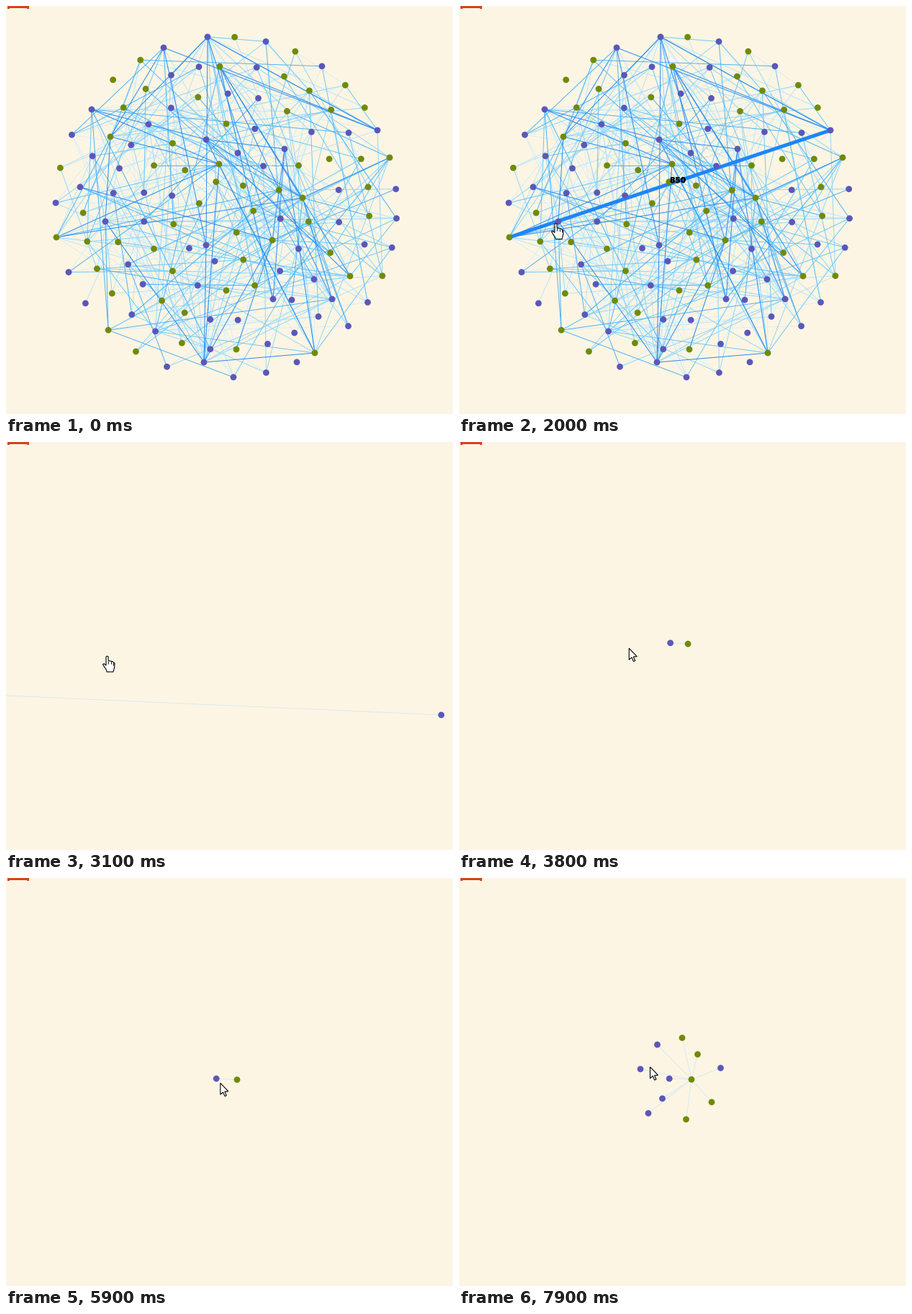
These frames come from a looping animation (621 by 568 pixels, 8 s). A matplotlib script:

```python
import numpy as np
import matplotlib.pyplot as plt
from matplotlib.animation import FuncAnimation
from matplotlib.collections import LineCollection
from matplotlib.patches import Polygon, Rectangle
from matplotlib.patheffects import withStroke

W, H, DPI = 621, 568, 72  # one point equals one pixel
PAPER, PURPLE, GREEN, STRONG = "#fdf5e3", "#5b57b9", "#718a07", "#1e86fa"
SHADES = ["#d8effa", "#b9e5fa", "#93d8fb", "#6cc9fa", "#4db4f7"]
DARK, PALE, PALE_FOCUS = "#2a8cf0", "#d5ebf3", "#cbe9f3"
DOT, CORE = 8.8 ** 2, 4.6 ** 2
CENTER = np.array([306, 280])

# radius, node count, first angle and angular swing of each shell of the disc
RINGS = [(237, 33, -8, -5.5), (199, 31, -11, 0), (158, 25, -29, 8),
         (116, 18, -40, 0), (77, 12, -48, 0), (38, 6, -22, 0)]
PURPLE_HUBS = [(280, 43), (219, 58), (119, 144), (278, 186), (387, 199), (516, 173),
               (103, 252), (138, 300), (278, 333), (453, 408), (371, 408), (275, 496)]
GREEN_HUBS = [(297, 84), (145, 182), (296, 220), (533, 211), (412, 267), (370, 326),
              (70, 322), (478, 376), (429, 483), (320, 478)]

rng = np.random.default_rng(5)


def make_nodes():
    shells = []
    for radius, count, first, swing in RINGS:
        turn = 2 * np.pi * np.arange(count) / count
        angle = np.radians(first + swing * (1 - np.cos(turn))) + turn
        shells.append(CENTER + radius * np.column_stack([np.sin(angle), -np.cos(angle)]))
    points = np.vstack(shells)
    colors = rng.choice([PURPLE, GREEN], len(points))
    hubs = []
    for spots, color in ((PURPLE_HUBS, PURPLE), (GREEN_HUBS, GREEN)):
        for spot in spots:
            gap = np.hypot(*(points - spot).T)
            gap[hubs] = np.inf
            hubs.append(int(gap.argmin()))
            points[hubs[-1]] = spot
            colors[hubs[-1]] = color
    return points, colors, hubs


nodes, node_colors, hubs = make_nodes()


def find(x, y):
    return int(np.hypot(*(nodes - (x, y)).T).argmin())


def random_links(count, pull, longest):
    found = set()
    while len(found) < count:
        a, b = sorted(rng.choice(len(nodes), 2, replace=False, p=pull / pull.sum()).tolist())
        if 50 < np.hypot(*(nodes[a] - nodes[b])) < longest:
            found.add((a, b))
    return rng.permutation(sorted(found))


hub_pull = np.zeros(len(nodes))
hub_pull[hubs] = 1
pull = rng.uniform(0.2, 1.3, len(nodes)) + 1.3 * hub_pull
weak = random_links(310, pull, 380)
strong = random_links(34, hub_pull, 400)
main_link = (find(70, 322), find(516, 173))
links = np.vstack([weak, strong, [main_link]])
shades = np.sort(rng.choice(len(SHADES), len(weak), p=[.28, .21, .2, .2, .11]))
link_colors = [SHADES[s] for s in shades] + [DARK] * len(strong) + [SHADES[1]]

# time, x and y of the pointer's tip
TRACK = np.array([(3, 590, 330), (12, 270, 262), (20, 134.5, 302.5), (26, 140.5, 298),
                  (31, 140.5, 298), (42, 291, 281), (46, 296.5, 282), (54, 302, 303),
                  (60, 297, 282), (66, 323, 282), (71, 323.5, 285), (79, 265.5, 263)])
HAND = np.array([(-1.5, 1), (0, 0), (1.5, 1), (1.7, 6.5), (7, 7.4), (10.4, 10), (10.3, 15),
                 (8.5, 22), (-0.5, 22), (-1, 19.5), (-6, 11.5), (-4.2, 10.6), (-1.5, 13)])
ARROW = np.array([(0, 0), (0, 16), (3.7, 12.6), (6.2, 18.3), (8.5, 17.3), (6, 11.8), (11, 11.5)])
KNUCKLES = [np.array([(x, y), (x, y + 4)]) for x, y in ((1.7, 6.5), (5, 7.3), (8, 8.5))]

LEAF_STARTS = np.array([(-150, 56), (189, 299), (120, 381), (44, 469), (800, 184),
                        (502, 88), (557, 231), (551, 379), (525, 462)])
LEAF_ENDS = np.array([(275.5, 232), (252, 266), (282.5, 307), (263, 327.5), (363.5, 264.5),
                      (310, 222.5), (331.5, 245.5), (351, 312), (315.5, 336)])
LEAF_COLORS = [PURPLE] * 5 + [GREEN] * 4
NODE0, NODE1, ROOT = np.array([(292.2, 279.3), (321, 280.8), (323, 280.5)])

fig = plt.figure(figsize=(W / DPI, H / DPI), dpi=DPI, facecolor=PAPER)
ax = fig.add_axes([0, 0, 1, 1])
ax.set(xlim=(0, W), ylim=(H, 0))
ax.axis("off")
for x, y, w, h in ((2, 0, 30, 3), (2, 3, 3, 1), (29, 3, 3, 1)):
    ax.add_patch(Rectangle((x, y), w, h, color="#d2451e", lw=0))

lines = ax.add_collection(LineCollection([], zorder=2))
focus = ax.add_collection(LineCollection([], zorder=3))
halo = ax.scatter([], [], s=13 ** 2, c="#dcdbe0", lw=0, zorder=4)
dots = ax.scatter([], [], lw=0, zorder=5)
labels = [ax.text(0, 0, "", family="DejaVu Sans", va="center", zorder=6,
                  path_effects=[withStroke(linewidth=0.4, foreground="black")])
          for _ in range(3)]
pointer = ax.add_patch(Polygon(ARROW, fc="white", ec="black", lw=1.1, zorder=8))
folds = ax.add_collection(LineCollection([], colors="black", linewidths=0.9, zorder=9))


def show_graph(points, colors, pairs, pair_colors, hovered=None):
    lines.set_segments([points[list(pair)] for pair in pairs])
    lines.set_color(pair_colors)
    lines.set_linewidth(1)
    dots.set_offsets(points)
    dots.set_facecolors(colors)
    sizes = np.full(len(points), DOT)
    if hovered is not None:
        sizes[hovered] = CORE
    dots.set_sizes(sizes)


def highlight(a, b, color, width):
    focus.set_segments([np.array([a, b])])
    focus.set_color(color)
    focus.set_linewidth(width)


def put_label(slot, text, x, y, size=11, **style):
    labels[slot].set(text=text, position=(x, y), fontsize=size,
                     **{"fontweight": "normal", "ha": "left", **style})


def link_under(tip):
    """Topmost link passing within 3 pixels of the tip."""
    a, b = nodes[links[:, 0]], nodes[links[:, 1]]
    span = b - a
    along = np.clip(((tip - a) * span).sum(1) / (span ** 2).sum(1), 0, 1)
    gap = np.hypot(*(a + along[:, None] * span - tip).T)
    near = np.flatnonzero(gap < 3)
    return near[-1] if len(near) else None


def network_scene(n, tip):
    points = nodes if n < 29 else CENTER + (nodes - CENTER) * 0.992
    named = find(138, 300) if n >= 26 else None
    show_graph(points, node_colors, links, link_colors, named)
    if named is not None:
        others = find(278, 333), find(296, 220)
        highlight(points[named], points[others[0]], SHADES[3], 4)
        for slot, (i, number) in enumerate(zip((named, *others), (32, 28, 49))):
            x, y = points[i]
            put_label(slot, f"Node {number}", x + 0.5, y + 15, 13 if i == named else 11)
        return True
    hit = link_under(tip) if 3 <= n < 22 else None
    if hit is None:
        return False
    a, b = points[links[hit]]
    highlight(a, b, STRONG, 5)
    x, y = (a + b) / 2
    weight = 850 - 10 * (len(links) - 1 - hit) % 850
    put_label(0, str(weight), x + 11, y - 4.5, 10.5, fontweight="bold", ha="center")
    return True


def pair_scene(n, tip):
    far = np.exp(-(n - 31) / 1.3)
    right = ROOT if n >= 66 else NODE1
    ends = np.array([NODE0 + np.array([312.5, 100.7]) * far, right + np.array([-640, 58]) * far])
    gaps = np.hypot(*(ends - tip).T)
    over = int(gaps.argmin()) if gaps.min() < 6 else None
    show_graph(ends, [PURPLE, GREEN], [(0, 1)], [PALE], over)
    if over is None:
        return n < 34
    halo.set_offsets([ends[over]])
    highlight(*ends, PALE_FOCUS, 4)
    for i, (x, y) in enumerate(ends):
        put_label(i, f"Node{i}", x, y + 15, 13 if i == over else 11)
    return True


def star_scene(n):
    move = 1 - (1 - (n - 71) / 8) ** 3
    leaves = LEAF_STARTS + (LEAF_ENDS - LEAF_STARTS) * move
    points = np.vstack([ROOT, NODE0, leaves])
    pairs = [(0, i) for i in range(1, len(points))]
    show_graph(points, [GREEN, PURPLE] + LEAF_COLORS, pairs, [PALE] * len(pairs))
    return False


def draw(n):
    focus.set_segments([])
    halo.set_offsets(np.empty((0, 2)))
    for label in labels:
        label.set_text("")
    tip = np.array([np.interp(n, TRACK[:, 0], TRACK[:, axis]) for axis in (1, 2)])
    if n < 30:
        hand = network_scene(n, tip)
    elif n == 30:
        show_graph(np.empty((0, 2)), [], [], [])
        hand = True
    elif n < 71:
        hand = pair_scene(n, tip)
    else:
        hand = star_scene(n)
    pointer.set_visible(n >= 3)
    pointer.set_xy((HAND if hand else ARROW) + tip)
    folds.set_segments([k + tip for k in KNUCKLES] if hand else [])
    return []


anim = FuncAnimation(fig, draw, frames=80, interval=100, repeat=True, repeat_delay=0,
                     init_func=lambda: draw(0))
plt.show()
```
